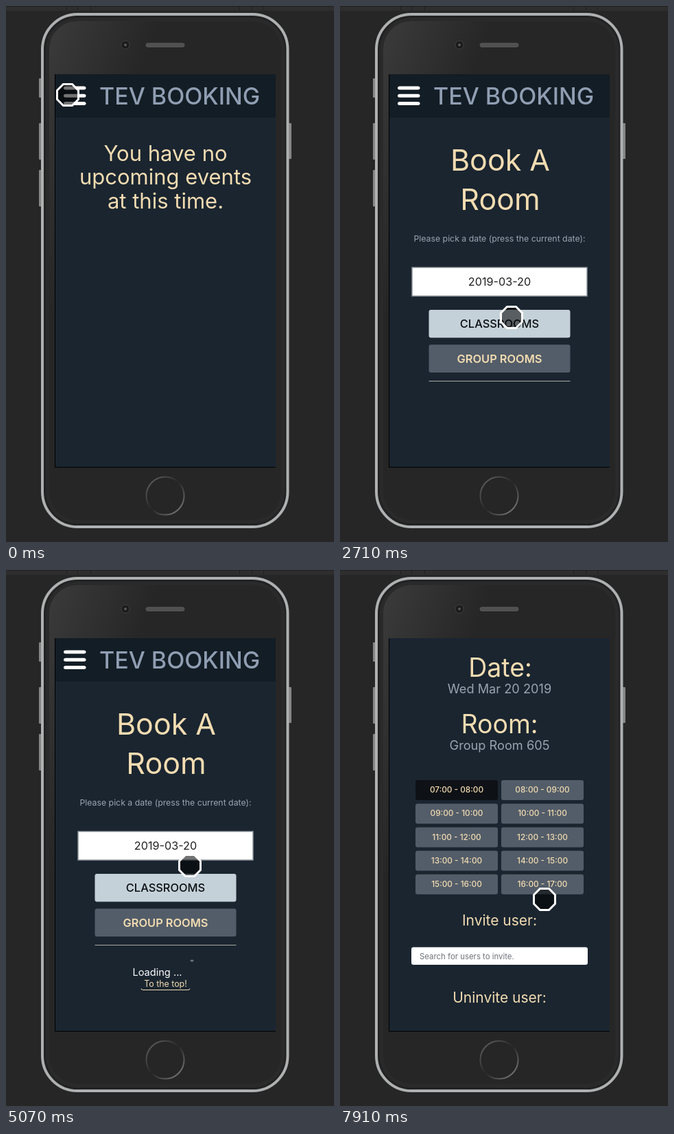
An HTML page that plays this animation: 478x778 px, repeating every 7990 ms.

```html
<!DOCTYPE html>
<html lang="en">
<head>
<meta charset="utf-8">
<title>Room booking on a phone</title>
<style>
  html, body { margin: 0; width: 100%; height: 100%; overflow: hidden; background: #262626; }
  svg { display: block; width: 478px; height: 778px; }
  text { font-family: Inter, "Open Sans", sans-serif; white-space: pre; }
</style>
</head>
<body>
<svg viewBox="0 0 478 778" xmlns="http://www.w3.org/2000/svg">
  <defs>
    <linearGradient id="gloss" x1="0" y1="0" x2=".7" y2=".55">
      <stop offset="0" stop-color="#3b3b3b"/>
      <stop offset=".22" stop-color="#303030"/>
      <stop offset=".42" stop-color="#262626"/>
    </linearGradient>
    <linearGradient id="ring" x1="0" y1="0" x2="1" y2="1">
      <stop offset="0" stop-color="#6a6a6a"/>
      <stop offset=".5" stop-color="#262626"/>
      <stop offset="1" stop-color="#8a8a8a"/>
    </linearGradient>
    <clipPath id="screen"><rect x="72" y="99" width="321" height="570"/></clipPath>
    <clipPath id="fold"><rect id="foldBox" x="72" y="162" width="321" height="0"/></clipPath>
  </defs>

  <rect width="478" height="778" fill="#262626"/>
  <rect width="478" height="7" fill="#2e2e2e"/>
  <path d="M0 .5H478M88.5 0V6M104.5 0V6M123.5 0V6M340.5 0V6M358.5 0V6M375.5 0V6" stroke="#202020"/>

  <g fill="#858585">
    <rect x="48" y="105" width="5" height="28" rx="1"/>
    <rect x="48" y="170" width="5" height="53" rx="1"/>
    <rect x="48" y="238" width="5" height="53" rx="1"/>
    <rect x="411" y="170" width="5" height="52" rx="1"/>
  </g>
  <rect x="53" y="12" width="357.5" height="744" rx="51" fill="#222" stroke="#aeb0b1" stroke-width="4"/>
  <rect x="58" y="17" width="348" height="734" rx="46" fill="#2a2a2a"/>
  <rect x="63" y="22" width="338" height="724" rx="41" fill="url(#gloss)"/>
  <circle cx="174" cy="56.5" r="6" fill="#1b1b1b" stroke="#414141"/>
  <circle cx="174" cy="56.5" r="2" fill="#55585c"/>
  <rect x="204" y="54" width="56" height="5.5" rx="2.7" fill="#505050" stroke="#5e5e5e" stroke-width=".8"/>
  <circle cx="232" cy="711" r="27.5" fill="none" stroke="url(#ring)" stroke-width="2"/>

  <rect x="71" y="99" width="322" height="571" fill="#000"/>
  <g clip-path="url(#screen)">
    <rect x="72" y="99" width="321" height="570" fill="#1a2530"/>
    <g id="page">
      <g id="content"></g>
      <g id="menu" clip-path="url(#fold)"></g>
      <g id="header"></g>
    </g>
    <rect id="bar" x="387.5" width="2.5" height="247" rx="1.2" fill="#5b6771"/>
  </g>
  <path id="cursor" d="M-6.5-15.5H6.5L15.5-6.5V6.5L6.5 15.5H-6.5L-15.5 6.5V-6.5Z"
    fill="#000" fill-opacity=".55" stroke="#fff" stroke-width="3"/>
</svg>

<script>
const LOOP = 7990, STEP = LOOP / 103;
const MID = 232.5;
const CREAM = '#f3dcb1', MUTED = '#98a5b1', SLATE = '#535d69', DEEP = '#39424e';
const MENU_HEIGHT = 345, LIST_SCROLL = 164, DETAIL_SCROLL = 513;
const BOOK_AT = 1480, LIST_AT = 3562, LOADING_AT = 4800, DETAIL_AT = 5180, SLOT_AT = 7320;
const $ = id => document.getElementById(id);

// Text placed by the middle of its capital letters.
function text(str, x, mid, size, fill, weight = 400, anchor = 'middle') {
  return `<text x="${x}" y="${mid + size * .363}" font-size="${size}" fill="${fill}"
    font-weight="${weight}" text-anchor="${anchor}">${str}</text>`;
}

function box(x, y, w, h, fill, extra = '') {
  return `<rect x="${x}" y="${y}" width="${w}" height="${h}" rx="3" fill="${fill}" ${extra}/>`;
}

function button(label, y, fill, color, weight, id = '') {
  return box(129.5, y, 206, 40.5, fill, id && `id="${id}"`) +
    text(label, MID, y + 20.5, 16.4, color, weight);
}

function link(label, mid, width) {
  const x = MID - width / 2, y = mid + 9.5;
  return text(label, MID, mid, 12.4, CREAM) +
    `<path d="M${x} ${y - 2}q0 2 3 2h${width - 6}q3 0 3-2" fill="none" stroke="${CREAM}"/>`;
}

function repeat(count, draw) {
  return Array.from({ length: count }, (_, i) => draw(i)).join('');
}

function homeView() {
  const lines = ['You have no', 'upcoming events', 'at this time.'];
  return repeat(3, i => text(lines[i], MID, 213.5 + i * 34.5, 31, CREAM));
}

function bookView() {
  return text('Book A', MID + 1, 223.5, 43, CREAM) +
    text('Room', MID + 1, 280, 43, CREAM) +
    text('Please pick a date (press the current date):', MID, 338, 12.3, MUTED) +
    '<rect x="105" y="379.5" width="255" height="41.5" fill="#fff" stroke="#8b9299" stroke-width="1.5"/>' +
    text('2019-03-20', MID, 400.5, 16.2, '#222') +
    button('CLASSROOMS', 441, '#c4d1d9', '#0c0f12', 500) +
    button('GROUP ROOMS', 491.5, SLATE, CREAM, 600, 'groupBtn') +
    '<path d="M129.5 544.5H335.5" stroke="#a9a99f"/>';
}

function listView() {
  return repeat(5, i => button('GROUP ROOM ' + (605 + i), 567 + i * 50.7, SLATE, CREAM, 600)) +
    link('To the top!', 822, 71);
}

function loadingView() {
  return text('Loading ...', 220.5, 583.5, 14.6, '#fff') +
    box(268.5, 565.5, 5, 3, '#6b747c') +
    link('To the top!', 600, 71);
}

function detailView() {
  const hour = h => String(h).padStart(2, '0') + ':00';
  const slot = i => {
    const x = i % 2 ? 235 : 110, y = 818 + (i >> 1) * 34.2;
    return box(x, y, 120, 29, SLATE, `id="slot${i}"`) +
      text(`${hour(7 + i)} - ${hour(8 + i)}`, x + 60, y + 14, 11.8, CREAM, 500);
  };
  return link('Close', 586.5, 47) +
    text('Date:', MID + 1, 654.5, 37.5, CREAM) +
    text('Wed Mar 20 2019', MID, 685, 18.2, MUTED) +
    text('Room:', MID, 736.5, 37.5, CREAM) +
    text('Group Room 605', MID, 767, 18.2, MUTED) +
    repeat(10, slot) +
    text('Invite user:', MID, 1021, 21, CREAM) +
    box(104, 1060.5, 257, 25.5, '#fff') +
    text('Search for users to invite.', 116, 1073.5, 11.4, '#6d7278', 400, 'start') +
    text('Uninvite user:', MID, 1133, 21, CREAM);
}

function menuItems() {
  const labels = ['UPCOMING', 'INVITES', 'MY BOOKINGS', 'BOOK A ROOM', 'GROUPS', 'PROFILE', 'LOG OUT'];
  const bell = `<path transform="translate(278 237.5)" fill="${CREAM}"
    d="M0-11.5Q1.5-11.5 1.5-9.5C6-8.5 7-5 7-1S8 4.500 10 6.500V8H-10V6.500C-8 4.500-7 3-7-1S-6-8.500-1.500-9.500Q-1.500-11.500 0-11.500ZM-3 9H3A3 3 0 0 1-3 9Z"/>`;
  return repeat(labels.length, i => {
    const y = 165.5 + i * 49;
    return box(77.5, y, 311, 47, 'none', 'stroke="#b5c8d2"') +
      text(labels[i], i === 1 ? 207 : MID, y + 23.5, 24.8, CREAM, 500);
  }) + bell + text('0', 298.5, 238, 22, '#e4e2dc');
}

function headerBar() {
  return '<rect x="72" y="99" width="321" height="63" fill="#131d25"/>' +
    repeat(3, i => box(84, 116.5 + i * 11.2, 32.5, 5, '#fff')) +
    text('TEV BOOKING', 136, 131, 34, '#909eb3', 500, 'start');
}

const views = { home: homeView, book: bookView, list: listView, loading: loadingView, detail: detailView };
$('content').innerHTML = Object.entries(views)
  .map(([id, draw]) => `<g id="${id}">${draw()}</g>`).join('');
$('menu').innerHTML = menuItems();
$('header').innerHTML = headerBar();

const ramp = (t, start, length) => Math.min(1, Math.max(0, (t - start) / length));
const smooth = u => u * u * (3 - 2 * u);
const easeOut = u => 1 - (1 - u) ** 3;

// Pointer stops: arrival time and place. Longer ways take longer.
const STOPS = [
  [1000, 220, 331], [2310, 250, 452], [3020, 267, 526], [4280, 255, 382], [4580, 268, 429],
  [5520, 316, 417], [7070, 201, 314], [7690, 306, 463], [7910, 298, 478]
];

function pointer(t) {
  let x = 90, y = 129;
  for (const [end, toX, toY] of STOPS) {
    const time = 150 + 1.8 * Math.hypot(toX - x, toY - y);
    if (t < end - time) break;
    const u = smooth(ramp(t, end - time, time));
    x += (toX - x) * u;
    y += (toY - y) * u;
    if (u < 1) break;
  }
  return [x, y];
}

function menuHeight(t) {
  return MENU_HEIGHT * (easeOut(ramp(t, 230, 350)) - easeOut(ramp(t, 1600, 350)));
}

function scrollTop(t) {
  return t < LOADING_AT
    ? LIST_SCROLL * smooth(ramp(t, LIST_AT, 640))
    : DETAIL_SCROLL * smooth(ramp(t, 5560, 820));
}

function show(id, from, to) {
  return t => { $(id).style.display = t >= from && t < to ? '' : 'none'; };
}

const switches = [
  show('home', 0, BOOK_AT), show('book', BOOK_AT, LOOP), show('list', LIST_AT, LOADING_AT),
  show('loading', LOADING_AT, DETAIL_AT), show('detail', DETAIL_AT, LOOP)
];

function render(t) {
  const open = menuHeight(t), scroll = scrollTop(t);
  switches.forEach(apply => apply(t));
  $('page').setAttribute('transform', `translate(0 ${-scroll})`);
  $('content').setAttribute('transform', `translate(0 ${open})`);
  $('foldBox').setAttribute('height', open ? open + 2 : 0);
  $('groupBtn').setAttribute('fill', t >= LIST_AT && t < LIST_AT + 300 ? DEEP : SLATE);
  $('slot0').setAttribute('fill', t >= SLOT_AT ? '#0e1116' : SLATE);
  $('bar').setAttribute('y', 102 + scroll * .427);
  $('bar').setAttribute('opacity', ramp(t, 5500, 60) - ramp(t, 6780, 240));
  $('cursor').setAttribute('transform', `translate(${pointer(t)})`);
}

const start = performance.now();
function tick() {
  const t = (performance.now() - start) % LOOP;
  render(Math.floor((t + 20) / STEP) % 103 * STEP);
  requestAnimationFrame(tick);
}
tick();
</script>
</body>
</html>
```
